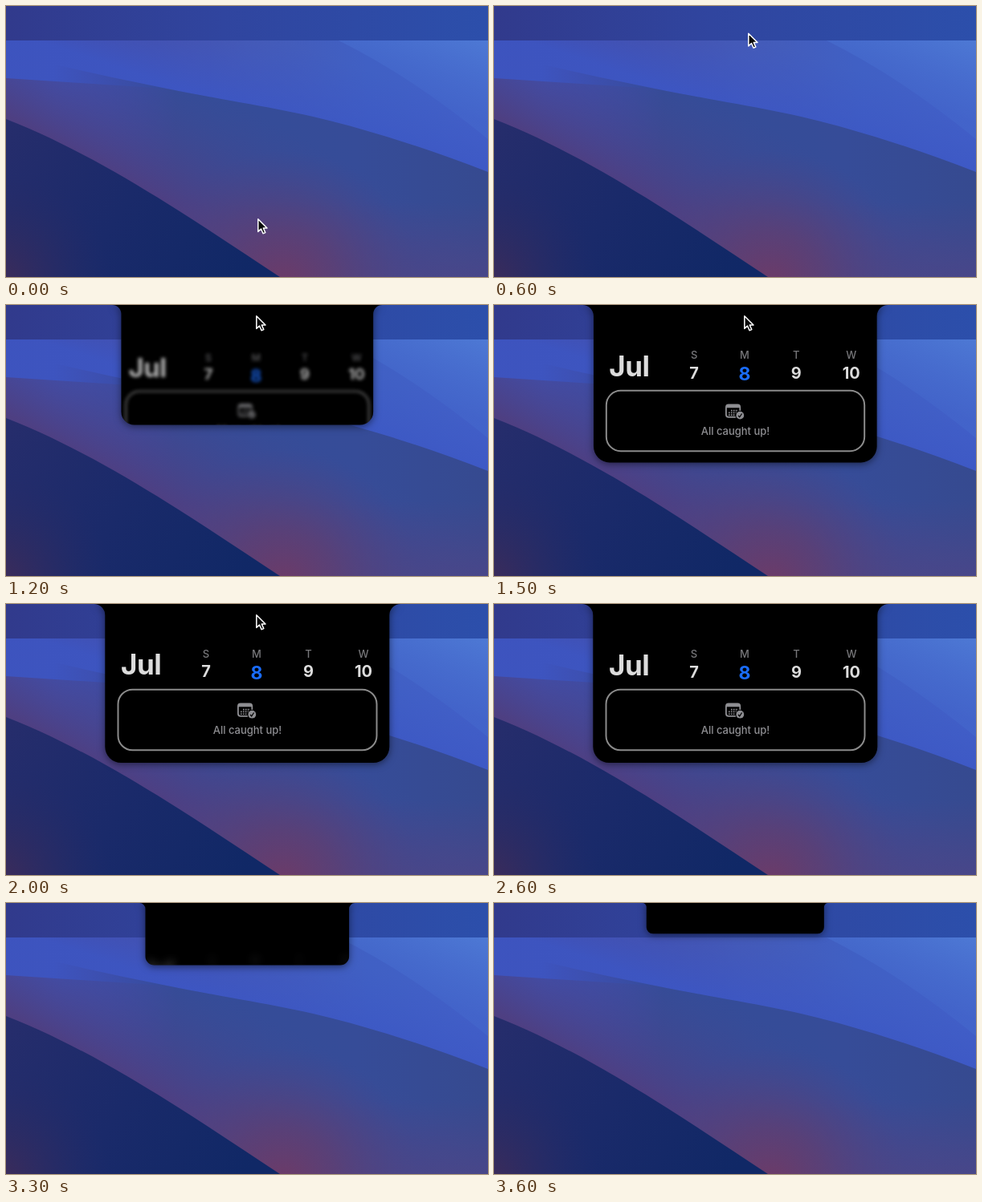
Write an HTML page that moves like this. It is 600 px wide and 338 px high and loops after 3.7 s.

```html
<!DOCTYPE html>
<html lang="en">
<head>
<meta charset="utf-8">
<title>Notch calendar</title>
<style>
  html, body { margin: 0; width: 100%; height: 100%; overflow: hidden; background: #344c98; }
  svg { display: block; width: 100vw; height: 100vh; }
  text { font-family: Inter, "Liberation Sans", sans-serif; text-anchor: middle; }
  .month { font-size: 35px; font-weight: 700; fill: #dcdcdc; text-anchor: start; letter-spacing: -.5px; }
  .day { font-size: 13px; font-weight: 500; fill: #77777a; }
  .date { font-size: 20px; font-weight: 700; fill: #dcdcdc; }
  .today { font-size: 23px; fill: #1a6dff; }
  .note { font-size: 13px; font-weight: 500; fill: #8e8e92; }
  #body { filter: drop-shadow(0 2px 5px rgba(0, 0, 0, .5)); }
</style>
</head>
<body>
<svg viewBox="0 0 600 338" preserveAspectRatio="none">
  <defs>
    <linearGradient id="sky">
      <stop offset="0" stop-color="#483f8b"/>
      <stop offset=".25" stop-color="#484ca0"/>
      <stop offset=".5" stop-color="#455ab6"/>
      <stop offset=".75" stop-color="#4060c4"/>
      <stop offset="1" stop-color="#4260c8"/>
    </linearGradient>
    <linearGradient id="deep" gradientUnits="userSpaceOnUse" x1="450" y1="80" x2="420" y2="170">
      <stop offset="0" stop-color="#3c56c4" stop-opacity="0"/>
      <stop offset="1" stop-color="#3c56c4" stop-opacity=".9"/>
    </linearGradient>
    <linearGradient id="ray" gradientUnits="userSpaceOnUse" x1="560" y1="30" x2="525" y2="115">
      <stop offset="0" stop-color="#4d78d4"/>
      <stop offset="1" stop-color="#4468cc" stop-opacity=".55"/>
    </linearGradient>
    <linearGradient id="band" gradientUnits="userSpaceOnUse" x1="60" y1="0" x2="600" y2="0">
      <stop offset="0" stop-color="#404494" stop-opacity="0"/>
      <stop offset=".28" stop-color="#344c98"/>
      <stop offset=".7" stop-color="#364c98"/>
      <stop offset="1" stop-color="#364a90"/>
    </linearGradient>
    <linearGradient id="dusk" gradientUnits="userSpaceOnUse" x1="215" y1="255" x2="290" y2="120">
      <stop offset="0" stop-color="#4e3f82"/>
      <stop offset="1" stop-color="#3f4a94" stop-opacity="0"/>
    </linearGradient>
    <linearGradient id="floor" x1="0" y1="0" x2="0" y2="1">
      <stop offset=".5" stop-color="#4a4688" stop-opacity="0"/>
      <stop offset="1" stop-color="#4a4688" stop-opacity=".85"/>
    </linearGradient>
    <radialGradient id="rose" gradientUnits="userSpaceOnUse" cx="345" cy="350" r="170">
      <stop offset="0" stop-color="#6e3a66"/>
      <stop offset=".4" stop-color="#603e70" stop-opacity=".7"/>
      <stop offset="1" stop-color="#4c4484" stop-opacity="0"/>
    </radialGradient>
    <linearGradient id="hill" gradientUnits="userSpaceOnUse" x1="0" y1="150" x2="300" y2="338">
      <stop offset="0" stop-color="#262d6c"/>
      <stop offset=".5" stop-color="#1a2a6a"/>
      <stop offset="1" stop-color="#102866"/>
    </linearGradient>
    <radialGradient id="ember" gradientUnits="userSpaceOnUse" cx="-10" cy="345" r="140">
      <stop offset="0" stop-color="#3e2b58"/>
      <stop offset="1" stop-color="#262c68" stop-opacity="0"/>
    </radialGradient>
    <linearGradient id="bar">
      <stop offset="0" stop-color="#313a8c"/>
      <stop offset=".45" stop-color="#30459f"/>
      <stop offset="1" stop-color="#2c4fab"/>
    </linearGradient>
    <clipPath id="clip"><path id="clipShape"/></clipPath>
  </defs>

  <!-- wallpaper -->
  <rect width="600" height="338" fill="url(#sky)"/>
  <rect width="600" height="338" fill="url(#deep)"/>
  <path d="M412 42Q505 88 600 166V42Z" fill="url(#ray)"/>
  <path d="M60 73Q130 89 200 103C300 123 360 130 440 153Q515 174 600 207V338H0V60Z" fill="url(#band)"/>
  <path d="M0 90L200 103C300 123 360 130 440 153Q515 174 600 207V338H0Z" fill="url(#dusk)"/>
  <rect y="150" width="600" height="188" fill="url(#floor)"/>
  <rect y="150" width="600" height="188" fill="url(#rose)"/>
  <path id="slope" d="M0 141C115 186 225 261 341 338H0Z" fill="url(#hill)"/>
  <use href="#slope" style="display:none"/>
  <path d="M0 141C115 186 225 261 341 338H0Z" fill="url(#ember)"/>
  <rect width="600" height="43" fill="url(#bar)"/>

  <g id="notch">
    <path id="body"/>
    <g clip-path="url(#clip)">
      <g id="content">
        <text class="month" x="143" y="88.5">Jul</text>
        <g id="days"></g>
        <rect x="139.5" y="106.8" width="322" height="75.5" rx="18" fill="none" stroke="#8b8b8b" stroke-width="2"/>
        <g fill="none" stroke="#8e8e92">
          <rect x="288.9" y="124.4" width="17.4" height="15.4" rx="3" stroke-width="1.8"/>
          <path d="M289 126.5H306" stroke-width="3.6"/>
          <path d="M295 131.6H304M292 134.4H304M292 137.2H300" stroke-width="1.6" stroke-dasharray="1.6 1.3"/>
        </g>
        <circle cx="306.3" cy="137.7" r="6"/>
        <circle cx="306.3" cy="137.7" r="4.9" fill="#8e8e92"/>
        <path d="M304 138L305.7 139.9L308.6 135.5" fill="none" stroke="#000" stroke-width="1.2"/>
        <text class="note" x="300.5" y="162">All caught up!</text>
      </g>
    </g>
  </g>

  <path id="cursor" d="M.8 .8V16.4L4.5 13L7 18.8L9.8 17.6L7.3 12H12Z" fill="#0a0a0a" stroke="#fff" stroke-width="1.5" stroke-linejoin="round"/>
</svg>
<script>
  const LOOP = 3700, STEP = 100;
  const OPEN = 1026, CLOSE = 3108, STIFF = .014;
  const el = id => document.getElementById(id);

  el('days').innerHTML = [['S', 7, 249], ['M', 8, 312], ['T', 9, 376.5], ['W', 10, 445]]
    .map(([day, date, x]) => {
      const now = date === 8;
      return `<text class="day" x="${x}" y="67">${day}</text>` +
        `<text class="date${now ? ' today' : ''}" x="${x}" y="${now ? 94 : 91.5}">${date}</text>`;
    }).join('');

  // time, x, y of the pointer tip
  const route = [
    [0, 313, 265], [100, 313, 265], [600, 316, 33.5], [800, 311, 13],
    [2200, 311, 13], [2600, 325, 345], [LOOP, 325, 345]
  ];

  function pointer(t) {
    const i = route.findIndex(k => k[0] > t);
    const [a, b] = [route[i - 1], route[i]];
    const u = (t - a[0]) / (b[0] - a[0]);
    const e = u * u * (3 - 2 * u);
    return [a[1] + (b[1] - a[1]) * e, a[2] + (b[2] - a[2]) * e];
  }

  // critically damped spring, 0 to 1
  function spring(ms) {
    const x = Math.max(0, ms) * STIFF;
    return 1 - (1 + x) * Math.exp(-x);
  }

  function outline(p) {
    const half = 110 + 67 * p, h = 37 + 161 * p;
    const r = 8 + 12 * p, ear = 5 + 9 * p;
    const l = 300.3 - half, w = 300.3 + half;
    return `M${l - ear} 0A${ear} ${ear} 0 0 1 ${l} ${ear}V${h - r}A${r} ${r} 0 0 0 ${l + r} ${h}` +
      `H${w - r}A${r} ${r} 0 0 0 ${w} ${h - r}V${ear}A${ear} ${ear} 0 0 1 ${w + ear} 0Z`;
  }

  function draw(now) {
    const t = Math.floor(now % LOOP / STEP) * STEP;
    const p = spring(t - OPEN) - spring(t - CLOSE);
    const shape = outline(p);
    el('notch').style.display = t < 1000 ? 'none' : '';
    el('body').setAttribute('d', shape);
    el('clipShape').setAttribute('d', shape);

    const content = el('content'), blur = 8 * (1 - p);
    const s = .8 + .2 * p;
    content.setAttribute('transform', `translate(300 120) scale(${s}) translate(-300 -120)`);
    content.style.filter = blur > .25 ? `blur(${blur}px)` : 'none';
    content.style.opacity = Math.min(1, p * 1.15);

    el('cursor').setAttribute('transform', `translate(${pointer(t)})`);
    requestAnimationFrame(() => draw(performance.now()));
  }
  draw(0);
</script>
</body>
</html>
```
